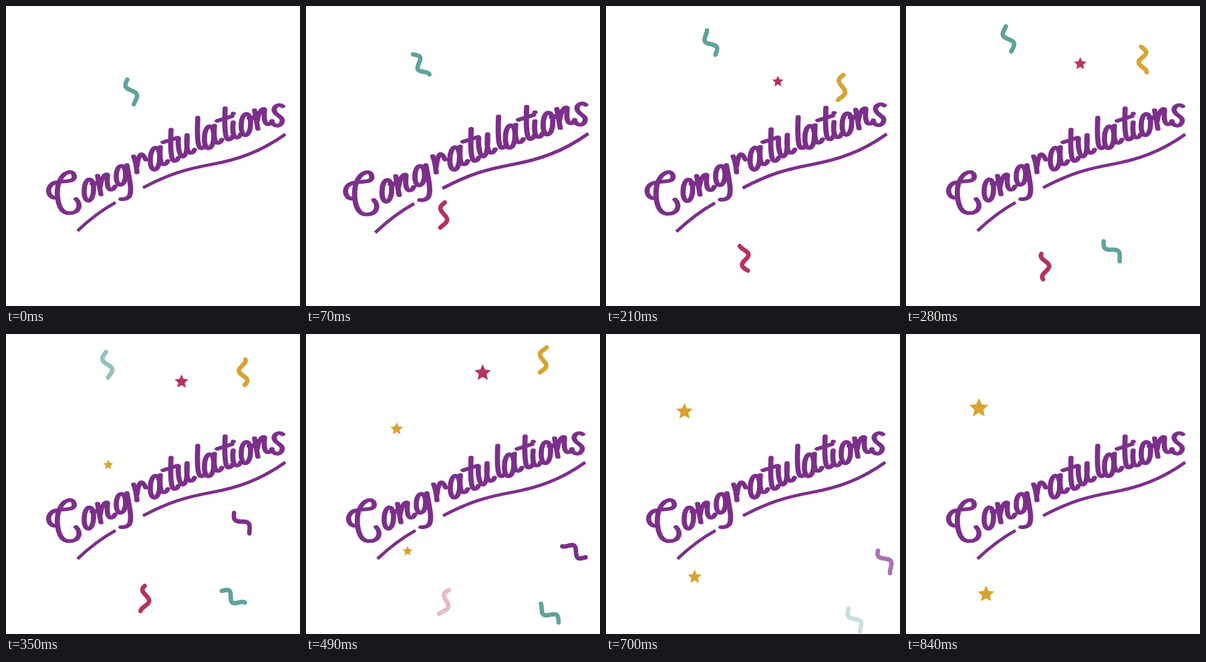
An HTML page with a canvas for the animation above (910 ms loop, 440x449 px).

```html
<!DOCTYPE html>
<html lang="en">
<head>
<meta charset="utf-8">
<title>Congratulations</title>
<style>
  html, body { margin: 0; width: 100%; height: 100%; overflow: hidden; background: #fff; }
  canvas { display: block; }
</style>
</head>
<body>
<canvas id="stage" width="440" height="449" role="img" aria-label="Congratulations"></canvas>
<script>
const ctx = document.getElementById('stage').getContext('2d');
const STEP = 70, STEPS = 13;
const PURPLE = '#7c2f8a', TEAL = '#5fa39b', RED = '#b8315f', GOLD = '#d8a330';
const PEN_ASPECT = 1.4; // the pen is wider than tall: thick stems, thin joins

const mix = (a, b, t) => a + (b - a) * t;

// Shared strokes of the handwriting
const hook = (x, y, h) => `M${x} ${y}c-1 ${h * 0.45} -1 ${h} 5 ${h}q4 0 6 -5`;
const bowl = (x, y, h) => `M${x - 7} ${y}a7 ${h} 4 1 0 14 -1a7 ${h} 4 1 0 -14 1`;

const glyphs = {
  C: 'M72 287C61 285 60 267 75 264S104 264 102 254S86 248 80 262S76 309 93 310S113 297 105 289',
  o: bowl(124, 276, 14.5) + 'M129 266q4 2 7 -2',
  n: 'M137 254l5 28M141 270q3 -18 10 -18' + hook(152, 253, 22),
  g: bowl(172, 254, 13) + 'M181 238c3 18 8 36 4 46q-4 6 -13 5',
  r: 'M191 225q4 10 5 24M196 240q4 -30 13 -10',
  a: bowl(223, 229, 15) + hook(231, 211, 26),
  t: hook(247, 185, 47) + 'M235 204l22 -7',
  u: 'M258 198c-1 14 2 30 8 27q6 -4 5 -32' + hook(271, 193, 27),
  l: hook(287, 167, 46),
  i: hook(340, 174, 23) + 'M340 161h.1',
  s: 'M414 150C408 145 399 151 402 158S416 166 413 174S400 180 398 173'
};

const lettering = new Path2D();
function addGlyphs(letters, dx = 0, dy = 0) {
  const place = new DOMMatrix([1 / PEN_ASPECT, 0, 0, 1, dx / PEN_ASPECT, dy]);
  for (const letter of letters) lettering.addPath(new Path2D(glyphs[letter]), place);
}
addGlyphs('Congratulis');
addGlyphs('at', 81, -32);
addGlyphs('on', 235, -98);

const underline = new Path2D(
  'M107 336.500Q135 310 164 294M205 272C245 251 270 244 308 237S380 219 418 192');

const ribbons = [
  { color: TEAL, born: 0, from: [188, 128], to: [150, 42], angle: 70, turn: 1 },
  { color: RED, born: 1, from: [206, 313], to: [209, 404], angle: 95, turn: -1 },
  { color: GOLD, born: 3, from: [353, 122], to: [355, 31], angle: 97, turn: 1 },
  { color: TEAL, born: 4, from: [309, 366], to: [374, 429], angle: 46, turn: 1 },
  { color: PURPLE, born: 5, from: [354, 282], to: [422, 342], angle: 48, turn: -1 }
];

// drag: how strongly the flight slows down along x and y
const stars = [
  { color: RED, born: 2, from: [251, 160], to: [265, 54], drag: [4, 4] },
  { color: GOLD, born: 5, from: [153, 196], to: [109, 111], drag: [1, 3.3] },
  { color: GOLD, born: 7, from: [152, 325], to: [107, 415], drag: [0.01, 0.01] }
];

function drawLettering(step) {
  const scale = 1 + 0.08 * Math.sin(Math.PI * Math.min(1, (step / 3.08) ** 2));
  ctx.save();
  ctx.translate(240, 235);
  ctx.scale(scale, scale);
  ctx.translate(-240, -235);
  ctx.strokeStyle = PURPLE;
  ctx.lineWidth = 4.8;
  ctx.lineCap = 'butt';
  ctx.stroke(underline);
  ctx.scale(PEN_ASPECT, 1);
  ctx.lineWidth = 5.5;
  ctx.lineCap = ctx.lineJoin = 'round';
  ctx.stroke(lettering);
  ctx.restore();
}

function drawRibbon({ color, born, from, to, angle, turn }, step) {
  const age = step - born;
  if (age < 0 || age > 6) return;
  const progress = 1 - 0.54 ** age;
  const phase = turn * 2 * Math.PI * progress;
  const cycles = 1.1 + 0.2 * Math.sin(Math.PI * progress);
  const length = 38;
  ctx.save();
  ctx.globalAlpha = Math.min(1, (7 - age) / 3);
  ctx.translate(mix(from[0], to[0], progress), mix(from[1], to[1], progress));
  ctx.rotate((angle - 12 * Math.sin(age * Math.PI / 4)) * Math.PI / 180);
  ctx.beginPath();
  for (let s = 0; s <= 1.001; s += 0.04) {
    ctx.lineTo((s - 0.5) * length, 5.8 * Math.sin(phase + 2 * Math.PI * cycles * s));
  }
  ctx.strokeStyle = color;
  ctx.lineWidth = 6.6;
  ctx.lineCap = ctx.lineJoin = 'round';
  ctx.stroke();
  ctx.restore();
}

function drawStar({ color, born, from, to, drag }, step) {
  const t = (step - born) / 7;
  if (t < 0 || t > 1) return;
  const [x, y] = drag.map((k, i) =>
    mix(from[i], to[i], (1 - Math.exp(-k * t)) / (1 - Math.exp(-k))));
  const radius = mix(7.8, 15, t);
  ctx.beginPath();
  for (let i = 0; i < 10; i++) {
    const r = i % 2 ? radius * 0.47 : radius;
    const angle = i * Math.PI / 5 - Math.PI / 2;
    ctx.lineTo(x + r * Math.cos(angle), y + r * Math.sin(angle));
  }
  ctx.fillStyle = color;
  ctx.fill();
}

function draw(now) {
  const step = Math.floor(now / STEP) % STEPS;
  ctx.fillStyle = '#fff';
  ctx.fillRect(0, 0, 440, 449);
  ribbons.forEach(ribbon => drawRibbon(ribbon, step));
  stars.forEach(star => drawStar(star, step));
  drawLettering(step);
}

let start;
function tick(now) {
  start ??= now;
  draw(now - start);
  requestAnimationFrame(tick);
}
draw(0);
requestAnimationFrame(tick);
</script>
</body>
</html>
```
